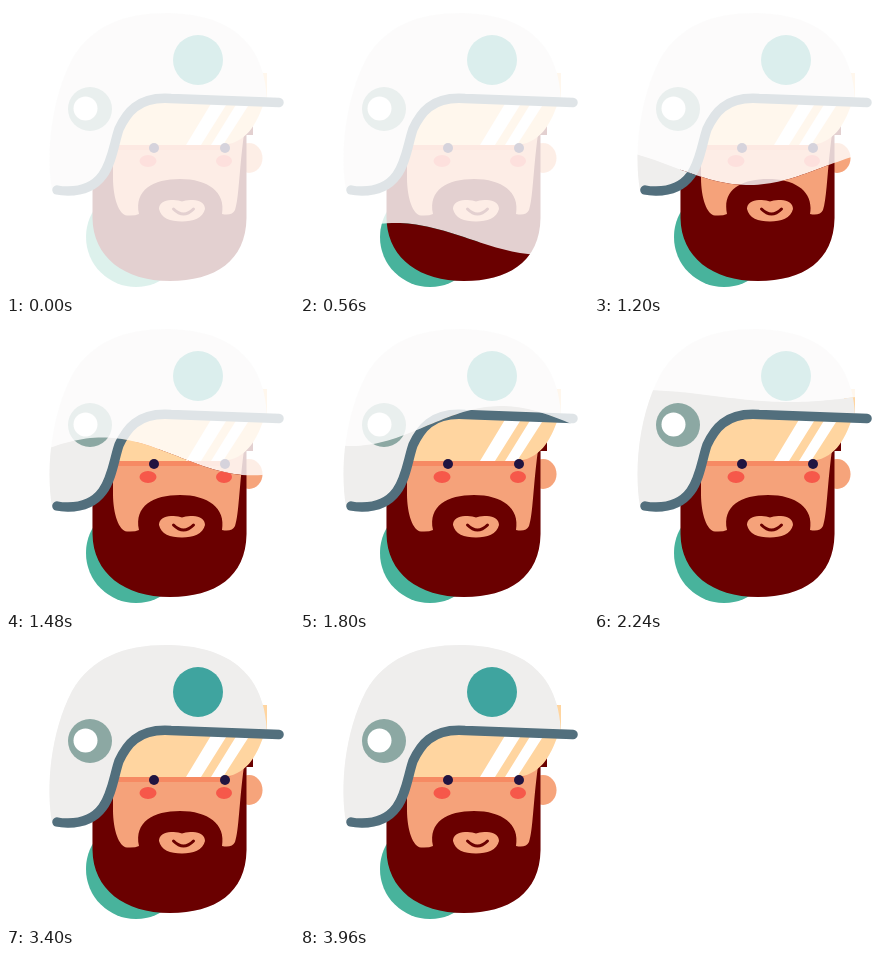
An HTML page that plays this animation: 288 by 288 pixels, repeating every 4000 ms.

```html
<!DOCTYPE html>
<html lang="en">
<head>
<meta charset="utf-8">
<title>Filling rider</title>
<style>
  html, body { margin: 0; width: 100%; height: 100%; overflow: hidden; background: #fff; }
  svg { display: block; width: 100vw; height: 100vh; }
</style>
</head>
<body>
<svg viewBox="0 0 288 288">
  <defs>
    <clipPath id="liquid"><path id="wave"/></clipPath>
    <g id="rider">
      <circle cx="130" cy="231" r="50" fill="#48b39c"/>
      <ellipse cx="243" cy="152" rx="13.5" ry="15" fill="#f6a47b"/>
      <path fill="#6a0000" d="M86.500 140V212C87 251 118 275 164 275C209 275 240 255 240.500 212V129H247V118H200Z"/>
      <path fill="#f5a27a" d="M107 120V172C107 192 113 209 121 209.500Q129 210 133 208C128 184 147 173 174 173C202 173 220 186 216 208Q226 210 229 204C233 192 233 165 238 128V118Z"/>
      <path fill="#f5a27a" d="M153 203C153 197 158 194.500 165 194Q172 193.500 176 195.500Q180 193.500 187 194C194 194.500 199 197 199 203C197 212 187 215.500 176 215.500C164 215.500 155 212 153 203Z"/>
      <path fill="none" stroke="#6a0000" stroke-width="3" stroke-linecap="round" d="M167.500 203Q177.500 213 187.500 203"/>
      <g fill="#f6584a">
        <ellipse cx="142" cy="155" rx="8.500" ry="6"/>
        <ellipse cx="218" cy="155" rx="8" ry="6"/>
      </g>
      <path fill="#f68a63" d="M107 138H225L219 144H107Z"/>
      <path fill="#ffd5a0" d="M107 139C114 105 128 93 160 92L258 97C250 119 240 138 215 139ZM250 67H261V95H250Z"/>
      <path fill="#fff" d="M206 96H222L195 139H180ZM231 97H244L217 139H205Z"/>
      <g fill="#211441">
        <circle cx="148" cy="142" r="5"/>
        <circle cx="219" cy="142" r="5"/>
      </g>
      <path fill="#efeeed" d="M46 184C40 150 44 95 66 53C85 20 118 7 160 7C209 7 259 25 261 95L165 92C130 90 119 108 112 123C104 146 104 185 62 185Z"/>
      <path fill="none" stroke="#526f7d" stroke-width="9.500" stroke-linecap="round" d="M273 96.500L165 92.500C131 90 120 108 113 123C105 146 105 185 62 185Q55 185 51 184"/>
      <circle cx="84" cy="103" r="22" fill="#8ca8a3"/>
      <circle cx="79.500" cy="102.500" r="12" fill="#fff"/>
      <circle cx="192" cy="54" r="25" fill="#3fa49f"/>
    </g>
  </defs>
  <use href="#rider" opacity=".18"/>
  <g clip-path="url(#liquid)"><use href="#rider"/></g>
</svg>
<script>
  const DURATION = 4000, STEP = 40, WAVELENGTH = 300;
  // time, mean surface height, wave amplitude
  const steps = [
    [0, 302, 17], [560, 233, 16], [1200, 161, 18], [1800, 104, 20],
    [2240, 74, 6], [2840, 35, 12], [4000, -25, 12]
  ];
  const wave = document.getElementById('wave');

  function surface(t) {
    const i = steps.findIndex(s => s[0] > t);
    const a = steps[i - 1], b = steps[i];
    const k = (t - a[0]) / (b[0] - a[0]);
    return [1, 2].map(n => a[n] + (b[n] - a[n]) * k);
  }

  function draw(now) {
    const t = Math.floor(now % DURATION / STEP) * STEP;
    const [level, amp] = surface(t);
    const trough = 61 + 0.328 * t;
    let d = 'M0 400';
    for (let x = 0; x <= 288; x += 4) {
      const y = level + amp * Math.cos((x - trough) / WAVELENGTH * 2 * Math.PI);
      d += `L${x} ${y.toFixed(2)}`;
    }
    wave.setAttribute('d', d + 'V400Z');
  }

  const start = performance.now();
  function tick() {
    draw(performance.now() - start);
    requestAnimationFrame(tick);
  }
  tick();
</script>
</body>
</html>
```
